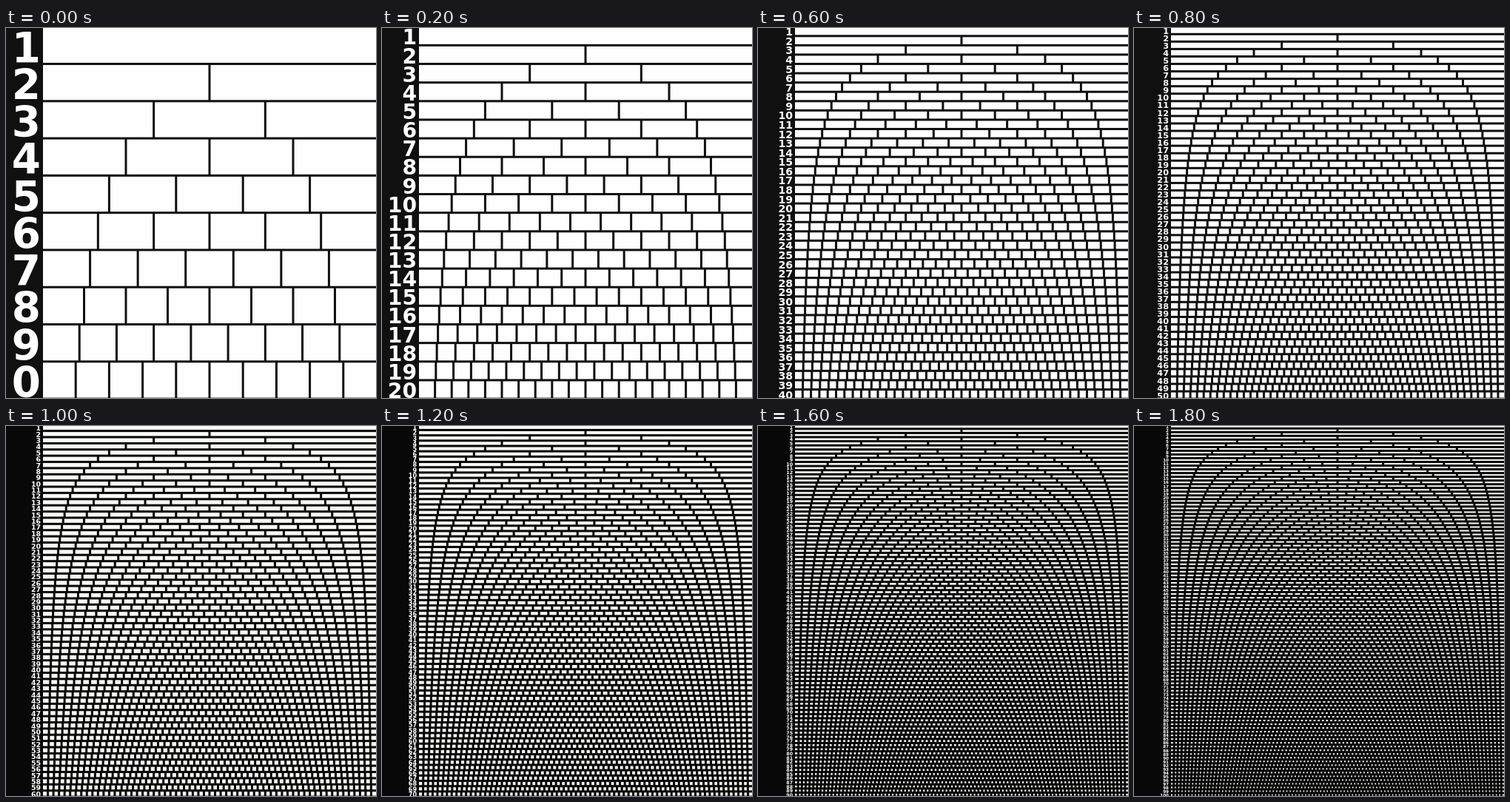
Write an HTML page with a canvas that moves like this. It is 500x500 px and loops after 2000 ms.

```html
<!DOCTYPE html>
<html lang="en">
<head>
<meta charset="utf-8">
<title>Divided rows</title>
<style>
  html, body { margin: 0; width: 100%; height: 100%; overflow: hidden; background: #111; }
  canvas { display: block; width: 500px; height: 500px; }
</style>
</head>
<body>
<canvas id="stage" width="500" height="500"></canvas>
<script>
const ctx = document.getElementById('stage').getContext('2d');
const STEP = 200, STEPS = 10;
const LEFT = 49, WIDTH = 452;
const TOP = -1.75, HEIGHT = 502.8;
const GUTTER = 50, LINE = 3;

// Row k is split into k equal cells; all rows share the full height.
function draw(rows) {
  const rowH = HEIGHT / rows;
  const dark = rows <= 50 ? '#101010' : '#080808';
  const light = rows <= 50 ? '#fefefe' : '#f7f9f5';

  ctx.fillStyle = light;
  ctx.fillRect(0, 0, 500, 500);
  ctx.fillStyle = dark;
  ctx.fillRect(0, 0, GUTTER, 500);

  for (let k = 1; k <= rows; k++) {
    const y = TOP + (k - 1) * rowH;
    ctx.fillRect(GUTTER, y + rowH - LINE / 2, 500 - GUTTER, LINE);
    for (let j = 1; j < k; j++) {
      ctx.fillRect(LEFT + WIDTH * j / k - LINE / 2, y, LINE, rowH);
    }
  }

  ctx.fillStyle = '#fff';
  ctx.font = `bold ${rowH * 1.12}px Verdana, "DejaVu Sans", sans-serif`;
  ctx.textAlign = 'right';
  ctx.textBaseline = 'alphabetic';
  for (let k = 1; k <= rows; k++) {
    // At the largest size only the last digit fits in the gutter.
    const label = rows === 10 ? k % 10 : k;
    ctx.fillText(label, 47, TOP + (k - 0.5) * rowH + rowH * 0.46);
  }
}

let shown = -1;
const start = performance.now();
function tick(now) {
  const step = Math.floor(Math.max(0, now - start) / STEP) % STEPS;
  if (step !== shown) {
    shown = step;
    draw((step + 1) * 10);
  }
  requestAnimationFrame(tick);
}
tick(start);
</script>
</body>
</html>
```
